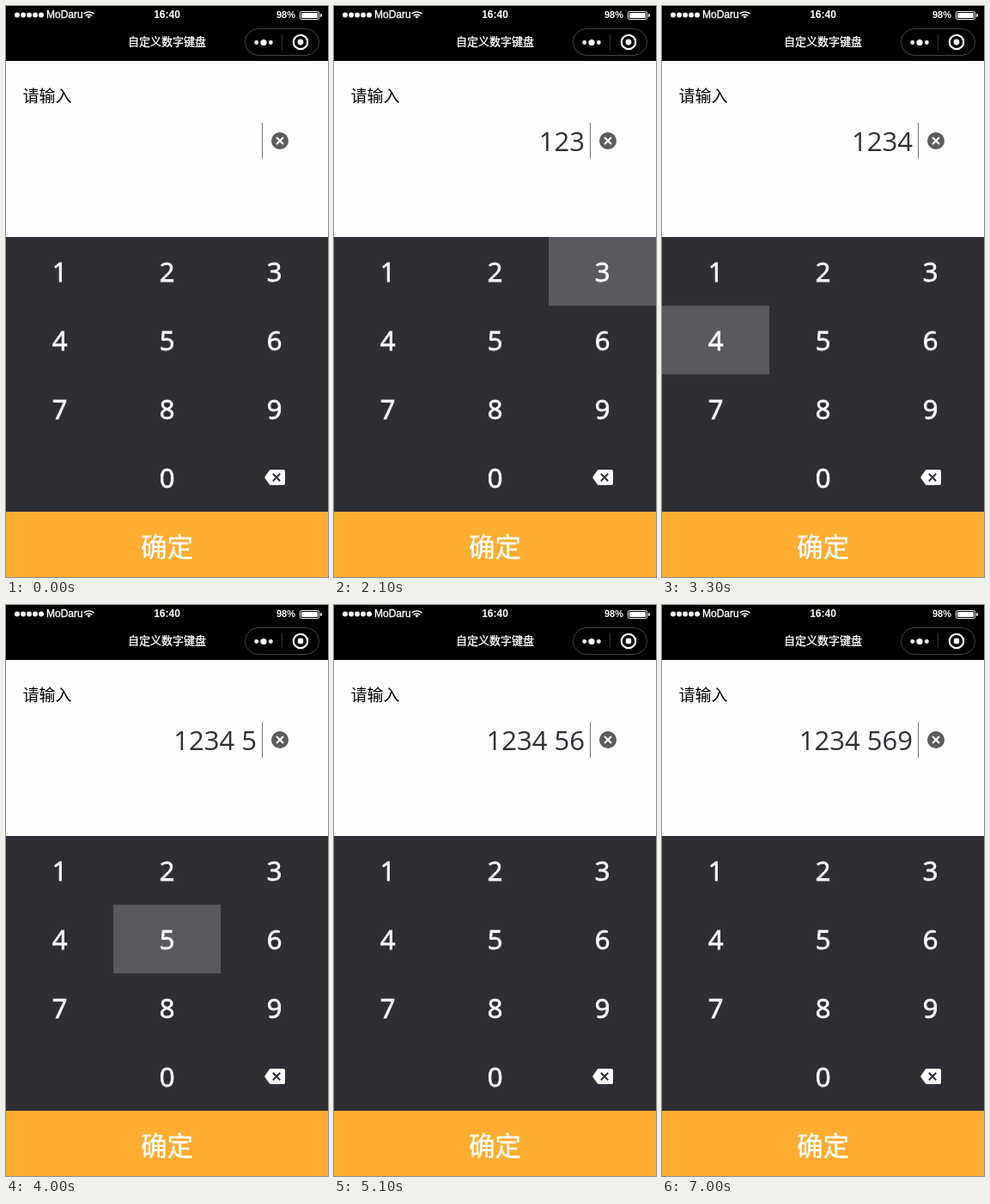
An HTML page that plays this animation: 375x665 px, repeating every 8000 ms.

```html
<!DOCTYPE html>
<html lang="zh-CN">
<head>
<meta charset="utf-8">
<title>自定义数字键盘</title>
<style>
  html, body { margin: 0; width: 100%; height: 100%; overflow: hidden; background: #fff; }
  svg { display: block; width: 375px; height: 665px; }
  text { font-family: "Noto Sans CJK SC", "Noto Sans CJK", sans-serif; fill: #fff; }
  .status { font-family: "Liberation Sans", Arial, sans-serif; font-size: 12px; }
  .digit { font-family: "Open Sans", "Noto Sans", sans-serif; font-size: 31px; white-space: pre; }
  .mid { text-anchor: middle; }
  .end { text-anchor: end; }
  .line { fill: none; stroke: #fff; }
  .firm { stroke: #fff; stroke-width: .35px; }
  #keys .digit { stroke: #fff; stroke-width: .8px; }
</style>
</head>
<body>
<svg viewBox="0 0 375 665">
  <rect width="375" height="665" fill="#fefefe"/>
  <rect width="375" height="64"/>

  <g id="signal" fill="#fff"></g>
  <text class="status firm" x="47" y="14">MoDaru</text>
  <g class="line" stroke-width="1.5">
    <path d="M90.5 9.2Q96.5 4.4 102.5 9.2M92.6 11.4Q96.5 8.4 100.4 11.4"/>
    <path d="M94.3 12.3Q96.5 10.9 98.7 12.3L96.5 14.6Z" fill="#fff" stroke="none"/>
  </g>
  <text class="status mid" x="187.5" y="14" font-weight="bold">16:40</text>
  <text class="status" x="315" y="14" style="font-size:11px" font-weight="bold">98%</text>
  <rect class="line" x="342.5" y="6.5" width="22" height="9" rx="2"/>
  <rect x="344" y="8" width="19" height="6" rx=".8" fill="#fff"/>
  <path d="M366 9Q368 9.2 368 11T366 13Z" fill="#fff"/>

  <text class="mid firm" x="187.5" y="46" font-size="13">自定义数字键盘</text>
  <rect x="278.5" y="26.5" width="86" height="31" rx="15.5" stroke="#444"/>
  <path d="M321.5 33V51" stroke="#333"/>
  <g fill="#fff">
    <circle cx="291.7" cy="42.5" r="2.4"/>
    <circle cx="300" cy="42.5" r="3.6"/>
    <circle cx="308.3" cy="42.5" r="2.4"/>
    <circle cx="343" cy="42" r="3.4"/>
  </g>
  <circle class="line" cx="343" cy="42" r="8.2" stroke-width="2.2"/>

  <text x="19.5" y="112" font-size="19" font-weight="300" style="fill:#000">请输入</text>
  <text id="value" class="digit end" x="292" y="169" style="fill:#2e2f36"></text>
  <path d="M298.5 136V178" stroke="#707682"/>
  <circle cx="319" cy="157" r="10" fill="#5b5b5b"/>
  <path class="line" d="M315 153l8 8m0-8l-8 8" stroke-width="2.2"/>

  <rect y="269" width="375" height="320" fill="#2e2f35"/>
  <rect id="press" width="125" height="80" fill="#5a595f"/>
  <g id="keys"></g>
  <path d="M301 549l5.6-8Q307.3 540 308.5 540H323Q325 540 325 542V556Q325 558 323 558H308.5Q307.3 558 306.6 557Z" fill="#fff"/>
  <path d="M310.8 544.8l8.4 8.4m0-8.4l-8.4 8.4" stroke="#2e2f35" stroke-width="2"/>

  <rect y="589" width="375" height="76" fill="#ffad30"/>
  <text class="mid firm" x="187.5" y="641.2" font-size="30.5">确定</text>
</svg>
<script>
const LOOP = 8000, HOLD = 100;
// [time, digit, whether the key lights up]
const presses = [
  [500, 1, false], [1300, 2, true], [2100, 3, true], [3300, 4, true],
  [4000, 5, true], [5000, 6, true], [6900, 9, true]
];
const $ = id => document.getElementById(id);
const column = n => n ? (n - 1) % 3 : 1;
const row = n => n ? Math.floor((n - 1) / 3) : 3;

$("signal").innerHTML = [0, 1, 2, 3, 4]
  .map(i => `<circle cx="${13 + i * 7}" cy="10.5" r="3"/>`).join("");
$("keys").innerHTML = [...Array(10).keys()]
  .map(n => `<text class="digit mid" x="${62.5 + column(n) * 125}" y="${321 + row(n) * 80}">${n}</text>`).join("");

function draw() {
  const t = performance.now() % LOOP;
  const typed = presses.filter(([time]) => time <= t);
  const digits = typed.map(p => p[1]).join("");
  $("value").textContent = digits.replace(/^(.{4})(?=.)/, "$1 ");

  const last = typed[typed.length - 1];
  const lit = last && last[2] && t < last[0] + HOLD;
  const press = $("press");
  press.setAttribute("visibility", lit ? "visible" : "hidden");
  if (lit) {
    press.setAttribute("x", column(last[1]) * 125);
    press.setAttribute("y", 269 + row(last[1]) * 80);
  }
  requestAnimationFrame(draw);
}
draw();
</script>
</body>
</html>
```
